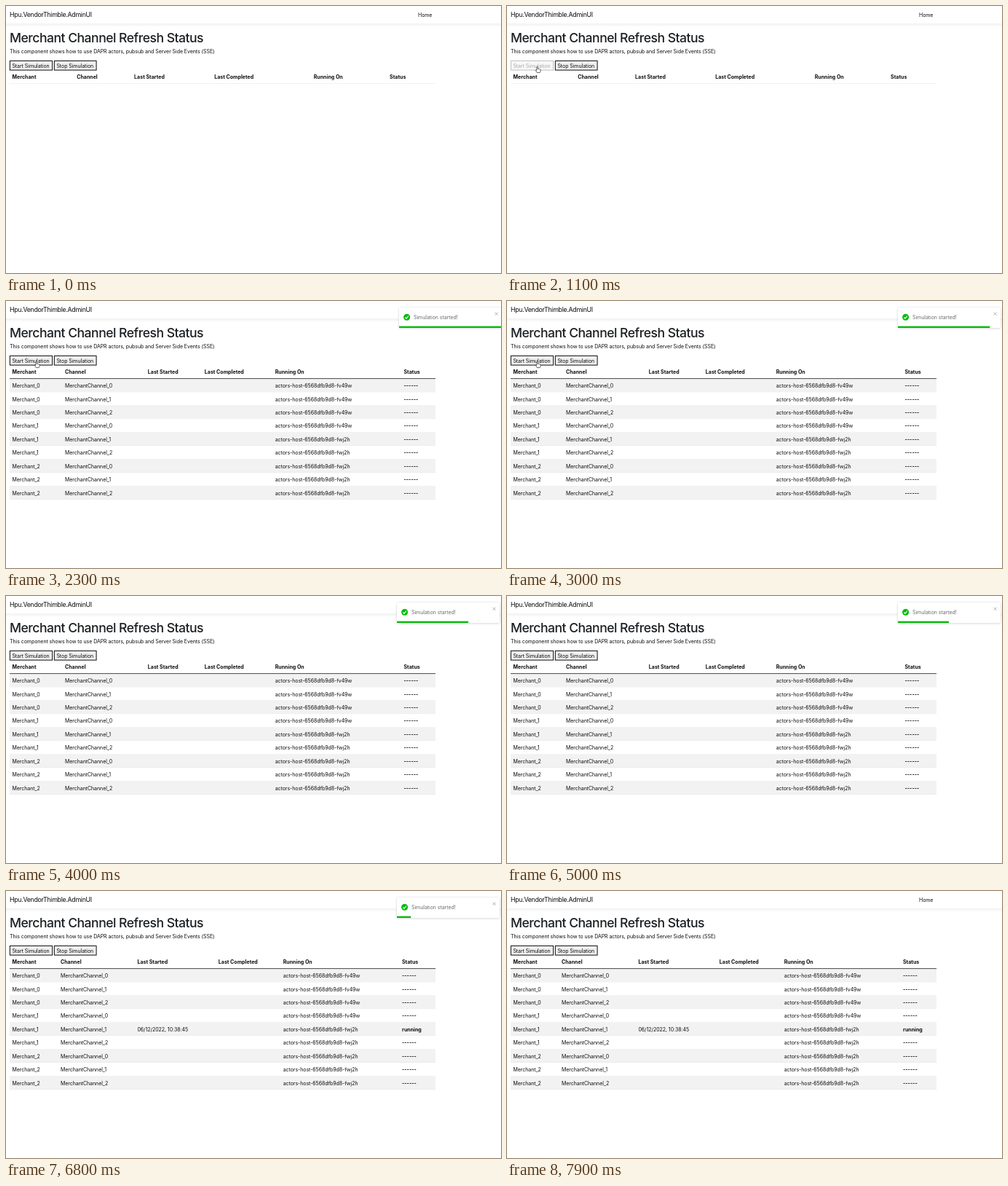
An HTML page for the animation above (8 s loop, 680 by 367 pixels).

```html
<!DOCTYPE html>
<html lang="en">
<head>
<meta charset="utf-8">
<title>Refresh status</title>
<style>
  html, body { margin: 0; width: 100%; height: 100%; overflow: hidden; background: #fff; }
  svg { display: block; width: 680px; height: 367px; }
  text { font: 400 7px Inter, "Open Sans", sans-serif; letter-spacing: -.055px; fill: #0c0d0e; white-space: pre; }
  .bold { font-weight: 700; letter-spacing: .03px; }
  .brand { font-size: 8.8px; letter-spacing: -.3px; }
  .title { font-size: 17.6px; font-weight: 500; letter-spacing: -.52px; fill: #1c1f22; }
  .note { fill: #6c6c6c; }
</style>
</head>
<body>
<svg id="stage" viewBox="0 0 680 367">
  <defs>
    <linearGradient id="fade" x2="0" y2="1">
      <stop stop-color="#f1f1f1"/><stop offset="1" stop-color="#fff"/>
    </linearGradient>
    <filter id="shadow" x="-10%" y="-30%" width="120%" height="170%">
      <feDropShadow dx="0" dy=".5" stdDeviation="1.6" flood-color="#000" flood-opacity=".2"/>
    </filter>
  </defs>
</svg>
<script>
const LOOP = 8000, STEP = 100;
const ROW_TOP = 107, ROW_H = 18.43, TABLE_RIGHT = 590;
const HEADINGS = ["Merchant", "Channel", "Last Started", "Last Completed", "Running On", "Status"];
const COLUMNS = {
  empty: [8.5, 97.2, 176.1, 286.2, 422.7, 527.1],
  idle: [8.5, 81, 194.8, 272.8, 369.7, 546.5],
  running: [8.5, 75, 180.4, 291.8, 380.7, 544]
};
const TOAST = { x: 537, y: 9, w: 141, h: 28, start: 2480, life: 5000 };
const GREEN = "#07bc0c";

const stage = document.getElementById("stage");

function add(parent, tag, attrs = {}, content = "") {
  const node = document.createElementNS("http://www.w3.org/2000/svg", tag);
  set(node, attrs);
  node.textContent = content;
  return parent.appendChild(node);
}
function set(node, attrs) {
  for (const key in attrs) node.setAttribute(key, attrs[key]);
}
function show(node, visible) {
  node.style.display = visible ? "" : "none";
}
const label = (parent, x, y, content, style = "") => add(parent, "text", { x, y, class: style }, content);
const box = (parent, x, y, width, height, fill) => add(parent, "rect", { x, y, width, height, fill });

function button(x, width, content) {
  const g = add(stage, "g");
  const frame = box(g, x + .4, 75.4, width - .8, 12.7, "#efefef");
  set(frame, { stroke: "#222", "stroke-width": 1.1 });
  return { frame, text: label(g, x + 3.4, 84.6, content) };
}

// Page header
box(stage, 0, 24, 680, 5, "url(#fade)");
label(stage, 5, 15, "Hpu.VendorThimble.AdminUI", "brand");
label(stage, 566, 14.5, "Home");
label(stage, 5, 49.7, "Merchant Channel Refresh Status", "title");
label(stage, 5, 65.1, "This component shows how to use DAPR actors, pubsub and Server Side Events (SSE)");
const startButton = button(5, 59, "Start Simulation");
button(66, 58.5, "Stop Simulation");

// Table
const headings = HEADINGS.map(name => label(stage, 0, 100.4, name, "bold"));
const rows = Array.from({ length: 9 }, (_, i) => {
  const g = add(stage, "g");
  const top = ROW_TOP + i * ROW_H, base = top + 12.1;
  box(g, 5, top, TABLE_RIGHT - 5, ROW_H, i % 2 ? "#fff" : "#f2f2f2");
  box(g, 5, top + ROW_H - .45, TABLE_RIGHT - 5, .45, "#dee2e6");
  const values = [
    `Merchant_${Math.floor(i / 3)}`, `MerchantChannel_${i % 3}`, "", "",
    `actors-host-6568dfb9d8-${i < 4 ? "fv49w" : "fwj2h"}`, "------"
  ];
  const cells = values.map((value, c) => label(g, 0, base, value, c === 5 ? "bold" : ""));
  return { g, cells };
});
const headLine = box(stage, 5, 106.2, TABLE_RIGHT - 5, .9, "#333");

// Toast
const toast = add(stage, "g");
set(box(toast, TOAST.x, TOAST.y, TOAST.w, TOAST.h, "#fff"), { rx: 1.5, filter: "url(#shadow)" });
add(toast, "circle", { cx: 547.6, cy: 22.3, r: 4.5, fill: GREEN });
add(toast, "path", { d: "M545.4 22.5l1.6 1.7 2.9-3.7", fill: "none", stroke: "#fff", "stroke-width": 1.1 });
label(toast, 557, 24.8, "Simulation started!", "note");
add(toast, "path", { d: "M668.7 15.7l3.8 3.8m0-3.8l-3.8 3.8", stroke: "#999", "stroke-width": .8 });
const progress = box(toast, TOAST.x, 34.6, TOAST.w, 2.4, GREEN);

// Pointers, with the tip at the local origin
const pointerStyle = { "stroke-width": .7, "stroke-linejoin": "round" };
const arrow = add(stage, "path", {
  d: "M0 0V8.4L2 6.6 3.3 9.6 4.6 9 3.3 6.2H6Z", fill: "#111", stroke: "#fff", ...pointerStyle
});
const hand = add(stage, "path", {
  d: "M-.8.6Q0-.5.8.6V3.5Q1.7 2.9 2.2 3.8 3.1 3.3 3.5 4.2 4.6 3.9 4.6 5.2 4.6 7.4 3.6 8.6H-.3L-2.3 5.6Q-2.2 4.4-.8 5.4Z",
  fill: "#fff", stroke: "#222", ...pointerStyle
});

const clamp = v => Math.max(0, Math.min(1, v));
const smooth = v => v * v * (3 - 2 * v);

function toastOffset(t) {
  const entry = [7, -8, 3, -2], exit = [-2, -8, 62];
  if (t < 2500) return entry[(t - 2100) / STEP];
  return t < 7600 ? 0 : exit[(t - 7600) / STEP];
}

function drawTable(t) {
  const state = t < 1200 ? "empty" : t < 6700 ? "idle" : "running";
  const columns = COLUMNS[state];
  const count = t < 1200 ? 0 : t < 1800 ? 4 : 9;
  headings.forEach((node, c) => set(node, { x: columns[c] }));
  set(headLine, { fill: count ? "#333" : "#efefef" });
  rows.forEach(({ g, cells }, i) => {
    show(g, i < count);
    cells.forEach((cell, c) => set(cell, { x: columns[c] }));
  });
  const active = state === "running", cells = rows[4].cells;
  cells[2].textContent = active ? "06/12/2022, 10:38:45" : "";
  cells[5].textContent = active ? "running" : "------";
}

function drawToast(t) {
  const visible = t >= 2100 && t < 7900;
  show(toast, visible);
  if (!visible) return;
  set(toast, { transform: `translate(${toastOffset(t)} 0)`, opacity: t === 7800 ? .8 : 1 });
  set(progress, { width: TOAST.w * clamp(1 - (t - TOAST.start) / TOAST.life) });
}

function drawPointer(t) {
  const visible = t >= 300 && t < 3400;
  const p = smooth(clamp((t - 200) / 800));
  const x = 163 - 121.4 * p, y = 126 - 43 * p;
  const over = y > 75 && y < 88.5 && (x < 64 || (x > 66 && x < 124.5));
  show(arrow, visible && !over);
  show(hand, visible && over);
  for (const node of [arrow, hand]) set(node, { transform: `translate(${x} ${y})` });
}

function draw(now) {
  const t = Math.floor(now % LOOP / STEP) * STEP;
  const disabled = t >= 1000 && t < 1900;
  set(startButton.frame, { stroke: disabled ? "#c4c4c4" : "#222", fill: disabled ? "#f8f8f8" : "#efefef" });
  startButton.text.style.fill = disabled ? "#aaa" : "";
  drawTable(t);
  drawToast(t);
  drawPointer(t);
}

const began = performance.now();
function tick() {
  draw(performance.now() - began);
  requestAnimationFrame(tick);
}
tick();
</script>
</body>
</html>
```
